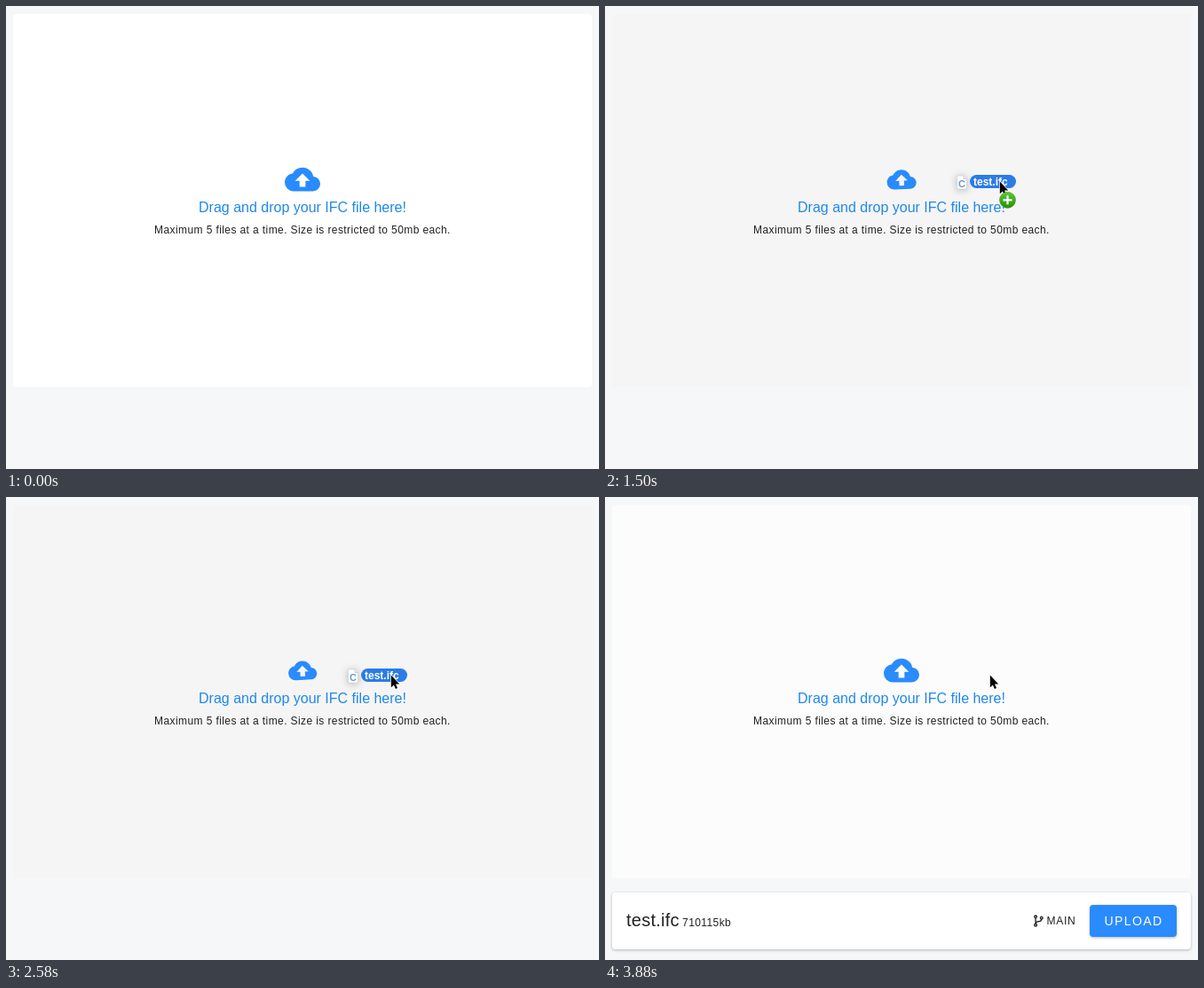
Recreate the animation shown at these times as an HTML page. Size 668x521 px, loop 4880 ms.

```html
<!DOCTYPE html>
<html lang="en">
<head>
<meta charset="utf-8">
<title>File drop zone</title>
<style>
  html, body { margin: 0; width: 100%; height: 100%; overflow: hidden; background: #f5f7f9; }
  svg { display: block; width: 668px; height: 521px; }
  text { font-family: "Liberation Sans", Arial, Helvetica, sans-serif; fill: #212121; white-space: pre; }
  .small { font-size: 12px; letter-spacing: .4px; }
  .raised { filter: drop-shadow(0 1px 1.5px rgba(0, 0, 0, .28)); }
</style>
</head>
<body>
<svg viewBox="0 0 668 521">
  <defs>
    <linearGradient id="green" x2="0" y2="1">
      <stop offset="0" stop-color="#5fc63a"/>
      <stop offset="1" stop-color="#239407"/>
    </linearGradient>
  </defs>
  <rect width="668" height="521" fill="#f5f7f9"/>
  <rect id="zone" x="8" y="9" width="652" height="420" rx="4"/>

  <g id="cloud" fill="#2a8bff">
    <path transform="scale(1.6667) translate(-12 -12)" d="M14,13V17H10V13H7L12,8L17,13M19.35,10.03C18.67,6.59 15.64,4 12,4C9.11,4 6.6,5.64 5.35,8.03C2.34,8.36 0,10.9 0,14A6,6 0 0,0 6,20H19A5,5 0 0,0 24,15C24,12.36 21.95,10.22 19.35,10.03Z"/>
  </g>
  <text x="334" y="232" font-size="16" text-anchor="middle" style="fill:#1e88ee">Drag and drop your IFC file here!</text>
  <text class="small" x="167.1" y="256">Maximum 5 files at a time. Size is restricted to 50mb each.</text>

  <g id="row">
    <rect class="raised" x="8" y="445" width="652" height="64" rx="4" fill="#fff"/>
    <text x="24" y="483" font-size="20" letter-spacing=".25">test.ifc</text>
    <text class="small" x="87.1" y="483">710115kb</text>
    <path transform="translate(480.4 469) scale(.6667)" fill="#212121" d="M13,14C9.64,14 8.54,15.35 8.18,16.24C9.25,16.7 10,17.76 10,19A3,3 0 0,1 4,19C4,17.69 4.83,16.58 6,16.17V7.83C4.83,7.42 4,6.31 4,5A3,3 0 0,1 10,5C10,6.31 9.17,7.42 8,7.83V13.12C8.88,12.47 10.16,12 12,12C14.67,12 15.56,10.66 15.85,9.77C14.77,9.32 14,8.25 14,7A3,3 0 0,1 20,7C20,8.34 19.12,9.5 17.91,9.86C17.65,11.29 16.68,14 13,14M7,18A1,1 0 0,0 7,20A1,1 0 0,0 7,18M7,4A1,1 0 0,0 7,6A1,1 0 0,0 7,4M17,6A1,1 0 0,0 17,8A1,1 0 0,0 17,6Z"/>
    <text x="497.4" y="481" font-size="12" letter-spacing=".8">MAIN</text>
    <rect class="raised" x="546" y="459" width="98" height="36" rx="4" fill="#2a8bff"/>
    <text x="562.5" y="482" font-size="14" letter-spacing="1.4" style="fill:#fff">UPLOAD</text>
  </g>

  <g id="hand">
    <g id="file">
      <g style="filter:drop-shadow(0 1px 4px rgba(0,0,0,.25))">
        <path d="M-47.5,-5H-40L-36.5,-1.5V10H-47.5Z" fill="#fff" stroke="#cfcfcf" stroke-width=".7"/>
      </g>
      <path d="M-40,-5V-1.5H-36.5" fill="#eee" stroke="#c4c4c4" stroke-width=".7"/>
      <text x="-42" y="8" font-size="11" font-weight="700" text-anchor="middle" style="fill:#6d9ab8">C</text>
      <rect x="-33" y="-6" width="52" height="15" rx="7.5" fill="#2b7ce6"/>
      <text x="-29" y="6" font-size="12" font-weight="700" style="fill:#fff">test.ifc</text>
    </g>
    <path d="M.8,1.4V15.2L3.9,12.4L5.9,16.9L8,16L6,11.6H10.2Z" fill="#000" stroke="#fff" stroke-width="1.4" paint-order="stroke"/>
    <g id="badge" transform="translate(9.5 22.3)">
      <circle r="9.2" fill="url(#green)" style="filter:drop-shadow(0 .5px .7px rgba(0,0,0,.35))"/>
      <path d="M-5,0H5M0,-5V5" stroke="#fff" stroke-width="2.2"/>
    </g>
  </g>
</svg>
<script>
const LOOP = 4880, FPS = 24 / 1000;
const GRAB = 1208, HOVER = 1442, BADGE_OFF = 2400, DROP = 3790;
const el = id => document.getElementById(id);
const [zone, cloud, row, hand, file, badge] =
  ["zone", "cloud", "row", "hand", "file", "badge"].map(el);

const mix = (a, b, k) => a + (b - a) * k;
const show = (node, on) => node.setAttribute("visibility", on ? "inherit" : "hidden");
const smooth = (t, from, to) => {
  const k = Math.min(1, Math.max(0, (t - from) / (to - from)));
  return k * k * (3 - 2 * k);
};

// CSS "ease": cubic-bezier(.25, .1, .25, 1)
function ease(x) {
  let lo = 0, hi = 1;
  const curve = (u, a, b) => 3 * u * (1 - u) ** 2 * a + 3 * u * u * (1 - u) * b + u ** 3;
  for (let i = 0; i < 20; i++) {
    const mid = (lo + hi) / 2;
    if (curve(mid, .25, .25) < x) lo = mid; else hi = mid;
  }
  return curve(lo, .1, 1);
}

// Shake pose [scale, degrees] at each tenth of a second
function pose(i) {
  if (i === 0 || i === 10) return [1, 0];
  if (i < 3) return [.8, -3];
  return [1.4, i % 2 ? 3 : -3];
}

function shake(t) {
  const p = t % 1000 / 100, i = Math.floor(p), k = ease(p - i);
  const a = pose(i), b = pose(i + 1);
  return [mix(a[0], b[0], k), mix(a[1], b[1], k)];
}

function draw(ms) {
  const t = Math.floor((ms + 5) * FPS) / FPS;
  const over = t >= HOVER && t < DROP;
  zone.setAttribute("fill", over ? "#f5f5f5" : t >= DROP ? "#fcfcfc" : "#fff");

  const [s, r] = over ? shake(t - HOVER) : [1, 0];
  cloud.setAttribute("transform", `translate(334 195.2) rotate(${r}) scale(${s})`);

  const go = smooth(t, GRAB, 1500), back = smooth(t, 1710, 1960);
  const x = mix(76.5, 444, go) - 11 * back;
  const y = mix(359, 196, go) + 3 * back;
  hand.setAttribute("transform", `translate(${x} ${y})`);

  show(hand, t >= GRAB);
  show(file, t > GRAB + 20 && t < DROP);
  show(badge, t < BADGE_OFF && t >= GRAB);
  show(row, t >= DROP);
}

const start = performance.now();
function tick() {
  draw((performance.now() - start) % LOOP);
  requestAnimationFrame(tick);
}
tick();
</script>
</body>
</html>
```
